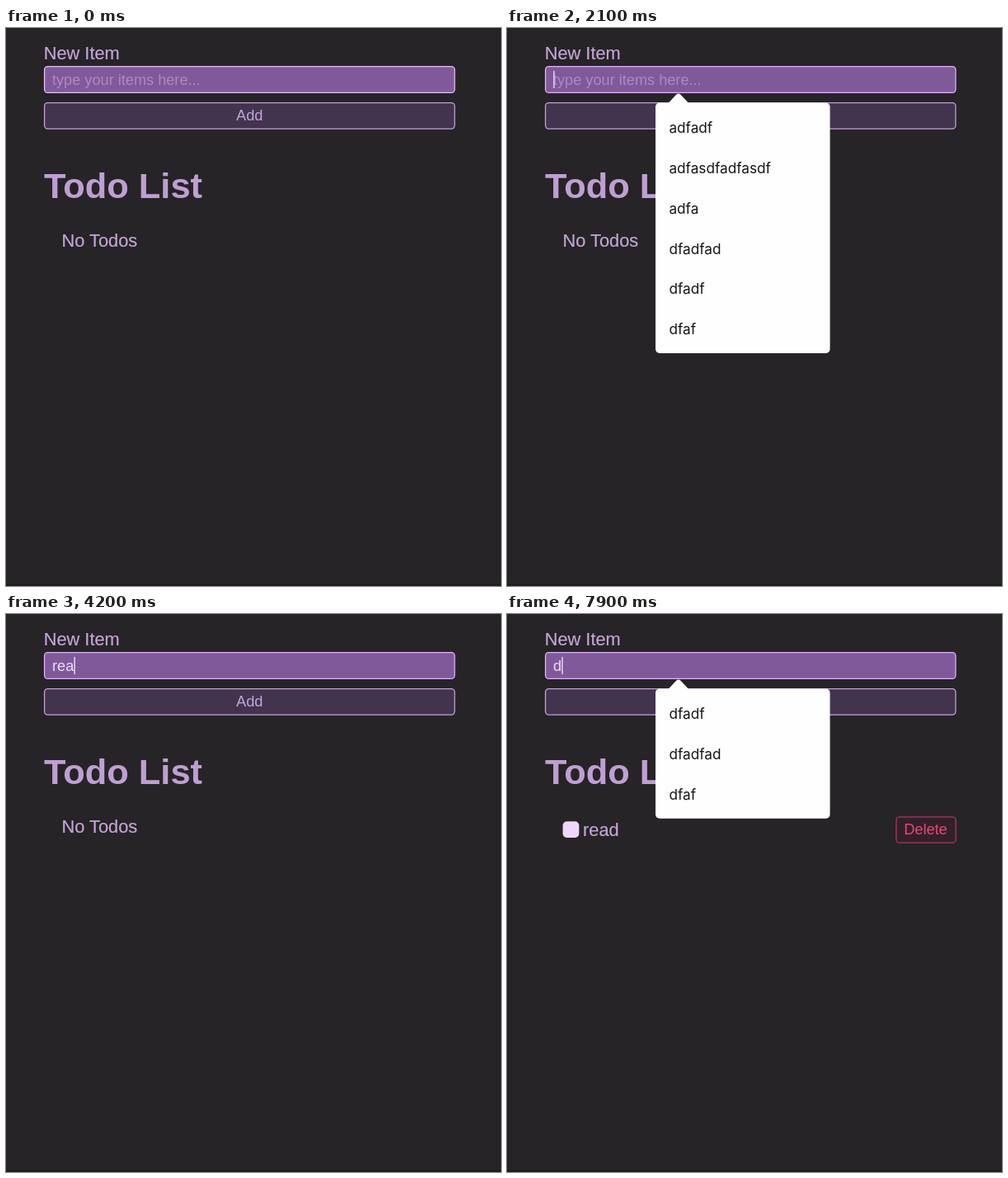
Write an HTML page that moves like this. It is 600 px wide and 676 px high and loops after 8 s.

```html
<!DOCTYPE html>
<html lang="en">
<head>
<meta charset="utf-8">
<title>Todo List</title>
<style>
  html, body { margin: 0; width: 100%; height: 100%; overflow: hidden; background: #262426; }
  svg { display: block; width: 600px; height: 676px; }
  text { font: 18.17px "Liberation Sans", Arial, sans-serif; fill: #c4a5d8; white-space: pre; }
  .big { font-size: 21.8px; stroke: #c4a5d8; stroke-width: .2; }
  .title { font-size: 43.4px; font-weight: bold; fill: #bf9fd3; }
  .hint { fill: #ac89c0; }
  .typed { fill: #eddcf8; }
  .field { fill: #80599b; stroke: #dfc0f2; stroke-width: 1.3; }
  .field.focus { stroke: #dfb0fb; }
  .add { fill: #42334e; stroke: #c2a2d6; stroke-width: 1.3; }
  .add.hover { fill: #573879; }
  .delete { fill: #32202a; stroke: #a33a5b; stroke-width: 1.3; }
  .delete-label { fill: #e34a74; }
  #menu text { font: 17.2px Inter, sans-serif; fill: #18161a; }
</style>
</head>
<body>
<svg viewBox="0 0 600 676">
  <defs>
    <path id="beamPath" d="M-4-9.2Q0-9.2 0-6V6Q0 9.2-4 9.2M4-9.2Q0-9.2 0-6M0 6Q0 9.2 4 9.2M-2 1H2"/>
  </defs>
  <rect width="600" height="676" fill="#262426"/>
  <rect y="673" width="600" height="3" fill="#211d20"/>

  <text class="big" x="45.7" y="38.3">New Item</text>
  <rect id="field" class="field" x="46.6" y="46.6" width="497.2" height="31.8" rx="4"/>
  <text id="hint" class="hint" x="56" y="68.5">type your items here...</text>
  <text id="typed" class="typed" x="56" y="68.5"></text>
  <rect id="caret" y="52" width="1.4" height="21" fill="#eddcf8"/>

  <rect id="add" class="add" x="46.6" y="90.6" width="497.2" height="31.5" rx="4"/>
  <text x="295.2" y="111.8" text-anchor="middle">Add</text>

  <text class="title" x="46" y="206.2">Todo List</text>
  <text id="empty" class="big" x="67.5" y="264.7">No Todos</text>
  <g id="item">
    <rect x="67.6" y="251.2" width="19.8" height="19.8" rx="5" fill="#efd6fb"/>
    <text class="big" x="92" y="268.5">read</text>
    <rect class="delete" x="471.8" y="245.8" width="72.2" height="31.4" rx="4"/>
    <text class="delete-label" x="481.2" y="267">Delete</text>
  </g>

  <g id="menu">
    <rect id="panel" x="180" y="90.5" width="211.5" rx="5" fill="#fefefe"/>
    <path d="M195 91.5L205.6 80.3Q207.8 78.6 210 80.3L220.6 91.5Z" fill="#fefefe"/>
    <g id="options"></g>
  </g>

  <g id="arrow">
    <path d="M11 3C17-2 27 0 29 8C31 13 38 12 41 15C45 19 43 24 41 28C47 32 46 38 43 41C42 47 47 58 45 63C42 68 35 67 31 66C25 64 26 58 28 52C22 50 17 47 18 40C14 38 13 34 12 31C2 29 0 20 1 12Z"
          fill="#dcd0e8" stroke="#fff" stroke-width="2"/>
    <path d="M.8 .8H12L.8 12Z" fill="#1e8ca3" stroke="#fff" stroke-width="1.5"/>
  </g>
  <g id="beam" fill="none" stroke-linecap="round">
    <use href="#beamPath" stroke="#fff" stroke-width="4.4"/>
    <use href="#beamPath" stroke="#151316" stroke-width="1.6"/>
  </g>
</svg>
<script>
const LOOP = 8000, STEP = 100;
const FOCUS = 1700, OPEN = 2100, SUBMIT = 5400;
const $ = id => document.getElementById(id);
const show = (id, on) => $(id).setAttribute('visibility', on ? 'visible' : 'hidden');

// time, text in the field
const typing = [[FOCUS, ''], [3300, 'r'], [3600, 're'], [3900, 'rea'], [4400, 'read'], [SUBMIT, ''], [7900, 'd']];
// time, x, y of the pointer, which hides when the menu opens
const path = [[700, 352, 196], [1000, 310, 94], [1400, 243.7, 61], [OPEN, 240, 61]];
const recent = ['adfadf', 'adfasdfadfasdf', 'adfa', 'dfadfad', 'dfadf', 'dfaf'];
const matches = ['dfadf', 'dfadfad', 'dfaf'];

function pointer(t) {
  const i = path.findIndex(p => p[0] > t);
  if (i < 1) return null;
  const [t0, x0, y0] = path[i - 1], [t1, x1, y1] = path[i];
  const k = (t - t0) / (t1 - t0);
  return [x0 + (x1 - x0) * k, y0 + (y1 - y0) * k];
}

function setMenu(list) {
  show('menu', list.length);
  $('panel').setAttribute('height', 10.9 + 48.77 * list.length);
  $('options').innerHTML = list.map((s, i) =>
    `<text x="196.4" y="${127.4 + 48.77 * i}">${s}</text>`).join('');
}

function render(t) {
  const [since, text] = typing.filter(e => e[0] <= t).pop() || [0, ''];
  const focused = t >= FOCUS;
  $('field').classList.toggle('focus', focused);
  $('typed').textContent = text;
  show('hint', !text);
  show('caret', focused && (t - since) % 1000 < 500);
  $('caret').setAttribute('x', 56.2 + (text ? $('typed').getComputedTextLength() : 0));

  show('empty', t < SUBMIT);
  show('item', t >= SUBMIT);
  setMenu(text === 'd' ? matches : t >= OPEN && !text && t < SUBMIT ? recent : []);

  const at = pointer(t);
  const inField = at && at[1] > 46 && at[1] < 79;
  show('arrow', at && !inField);
  show('beam', inField);
  $('add').classList.toggle('hover', !!at && at[1] > 90 && at[1] < 123);
  if (at) $(inField ? 'beam' : 'arrow').setAttribute('transform', `translate(${at})`);
}

const start = performance.now();
let last = -1;
function tick() {
  const t = Math.floor((performance.now() - start) % LOOP / STEP) * STEP;
  if (t !== last) render(last = t);
  requestAnimationFrame(tick);
}
tick();
</script>
</body>
</html>
```
